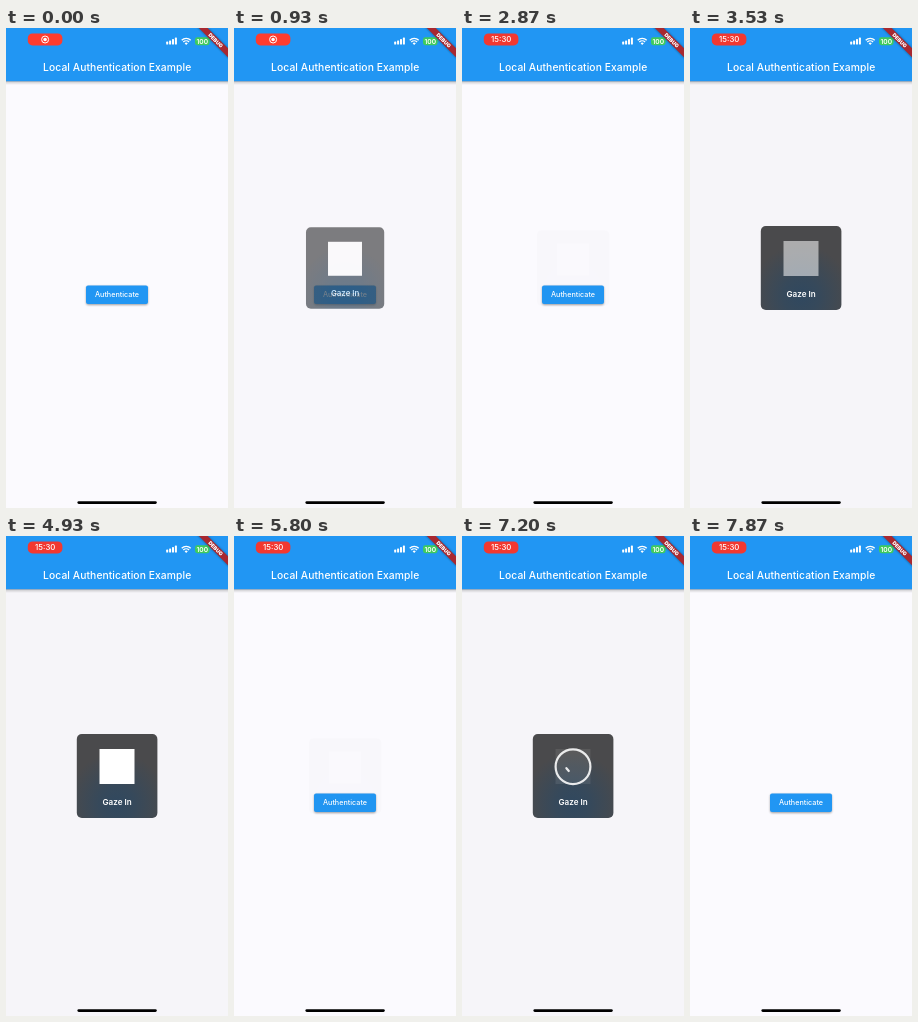
An HTML page that plays this animation: 222 px wide and 480 px high, repeating every 7940 ms.

```html
<!DOCTYPE html>
<html lang="en">
<head>
<meta charset="utf-8">
<title>Local Authentication Example</title>
<style>
  html, body { margin: 0; width: 100%; height: 100%; overflow: hidden; background: #fbfafe; }
  svg { display: block; width: 100%; height: 100%; }
  text { font-family: Inter, Roboto, sans-serif; fill: #fff; text-anchor: middle; }
</style>
</head>
<body>
<svg viewBox="0 0 222 480">
  <defs>
    <linearGradient id="barShade" x2="0" y2="1">
      <stop offset="0" stop-color="#000" stop-opacity=".34"/>
      <stop offset=".4" stop-color="#000" stop-opacity=".12"/>
      <stop offset="1" stop-color="#000" stop-opacity="0"/>
    </linearGradient>
    <radialGradient id="tint" cx=".5" cy=".84" r=".62">
      <stop offset="0" stop-color="#30485f"/>
      <stop offset=".35" stop-color="#36495b"/>
      <stop offset="1" stop-color="#4a4a4c"/>
    </radialGradient>
    <filter id="soft" x="-20%" y="-40%" width="140%" height="190%">
      <feGaussianBlur stdDeviation=".9"/>
    </filter>
  </defs>

  <rect width="222" height="480" fill="#fbfafe"/>

  <!-- button -->
  <rect x="80.2" y="258.4" width="61.6" height="18.6" rx="2" fill="#000" opacity=".38" filter="url(#soft)"/>
  <rect x="80" y="257.4" width="62" height="18.7" rx="2" fill="#2196f3"/>
  <text x="111" y="269.3" font-size="7.2" font-weight="500" letter-spacing=".02">Authenticate</text>

  <!-- app bar -->
  <rect y="53" width="222" height="4" fill="url(#barShade)"/>
  <rect width="222" height="53.2" fill="#2196f3"/>
  <text x="111.2" y="42.6" font-size="10.3" font-weight="450" letter-spacing=".08">Local Authentication Example</text>

  <!-- status bar -->
  <rect id="pill" x="21.8" y="5.4" width="34.6" height="12" rx="4.6"/>
  <g id="rec">
    <circle cx="39.1" cy="11.5" r="3.5" fill="none" stroke="#fff"/>
    <circle cx="39.1" cy="11.5" r="1.8" fill="#fff"/>
  </g>
  <text id="clock" x="39.2" y="14.3" font-size="7.8" font-weight="500">15:30</text>
  <g fill="#fff">
    <rect x="160.2" y="13.6" width="2" height="3" rx=".6"/>
    <rect x="163.1" y="12.4" width="2" height="4.2" rx=".6"/>
    <rect x="166" y="11" width="2" height="5.6" rx=".6"/>
    <rect x="168.9" y="9.6" width="2" height="7" rx=".6"/>
    <path d="M180.2 17l-1.6-1.8a2.3 2.3 0 0 1 3.2 0z"/>
  </g>
  <path d="M175.7 12.2a6.4 6.4 0 0 1 9 0M177.3 14a4.2 4.2 0 0 1 5.8 0" fill="none" stroke="#fff" stroke-width="1.4"/>
  <rect x="189" y="9.2" width="14.6" height="8" rx="2.4" fill="#3ecb5d"/>
  <path d="M204.4 11.9q1 1.3 0 2.6z" fill="#3ecb5d"/>
  <text x="196.3" y="15.6" font-size="6.6" font-weight="600">100</text>

  <!-- corner ribbon -->
  <g transform="translate(222 0) rotate(45)">
    <rect x="-24" y="14.4" width="48" height="6.3" fill="#000" opacity=".4" filter="url(#soft)"/>
    <rect x="-24" y="14.4" width="48" height="6.2" fill="#a82830"/>
    <text y="19.4" font-size="5.2" font-weight="900">DEBUG</text>
  </g>

  <rect id="dim" y="53.2" width="222" height="426.8" fill="#000"/>

  <!-- prompt -->
  <g id="panel">
    <rect x="70.8" y="198" width="80.6" height="84" rx="5" fill="url(#tint)"/>
    <rect id="mark" x="93.5" y="213" width="35" height="35" fill="#fff"/>
    <g id="done" fill="none" stroke="#fff" stroke-linecap="round" stroke-linejoin="round">
      <circle cx="111" cy="230.7" r="17.4" stroke-width="2.2"/>
      <path id="tick" d="M104.4 232.2l4.4 5.2l7.4-10.4" stroke-width="2.2" pathLength="1" stroke-dasharray="1 2"/>
    </g>
    <text x="111.1" y="268.8" font-size="8.1" font-weight="600">Gaze In</text>
  </g>

  <rect x="71.4" y="473.2" width="79.4" height="2.7" rx="1.35" fill="#000"/>
</svg>
<script>
const LOOP = 7940;
const PULSE = 930;
// start of each prompt, its success time and the start of its fade
const prompts = [
  { start: 600, ok: 1400, leave: 1780 },
  { start: 2670, ok: Infinity, leave: 5000 },
  { start: 5600, ok: 7060, leave: 7440 }
];

const el = id => document.getElementById(id);
const [pill, rec, clock, dim, panel, mark, done, tick] =
  ["pill", "rec", "clock", "dim", "panel", "mark", "done", "tick"].map(el);

const ease = (t, from, span) => {
  const p = Math.min(1, Math.max(0, (t - from) / span));
  return p * p * (3 - 2 * p);
};
const mix = (a, b, p) => a + (b - a) * p;
const fade = (node, value) => node.setAttribute("opacity", value);

// scale about the middle of the prompt
const zoom = (node, s, cy) =>
  node.setAttribute("transform", `translate(111 ${cy}) scale(${s}) translate(-111 ${-cy})`);

function drawPill(t) {
  const p = ease(t, 1360, 240);
  pill.setAttribute("fill", `rgb(${mix(255, 242, p)} ${mix(60, 56, p)} ${mix(46, 48, p)})`);
  fade(rec, 1 - ease(p, 0, 0.6));
  fade(clock, ease(p, 0.4, 0.6));
}

function drawPrompt(t) {
  const { start, ok, leave } = prompts.findLast(p => t >= p.start) || prompts[0];
  const show = ease(t, start + 190, 220) * (1 - ease(t, leave, 260));
  fade(panel, show);
  fade(dim, 0.018 * show);
  zoom(panel, 0.9 + 0.1 * show, 240);

  const passed = ease(t, ok, 180);
  const glow = 0.77 + 0.23 * Math.cos(2 * Math.PI * (t - start - 400) / PULSE);
  fade(mark, glow * (1 - passed));
  fade(done, passed);
  tick.setAttribute("stroke-dashoffset", 1 - ease(t, ok + 80, 220));
}

function frame() {
  const t = performance.now() % LOOP;
  drawPill(t);
  drawPrompt(t);
  requestAnimationFrame(frame);
}
frame();
</script>
</body>
</html>
```
